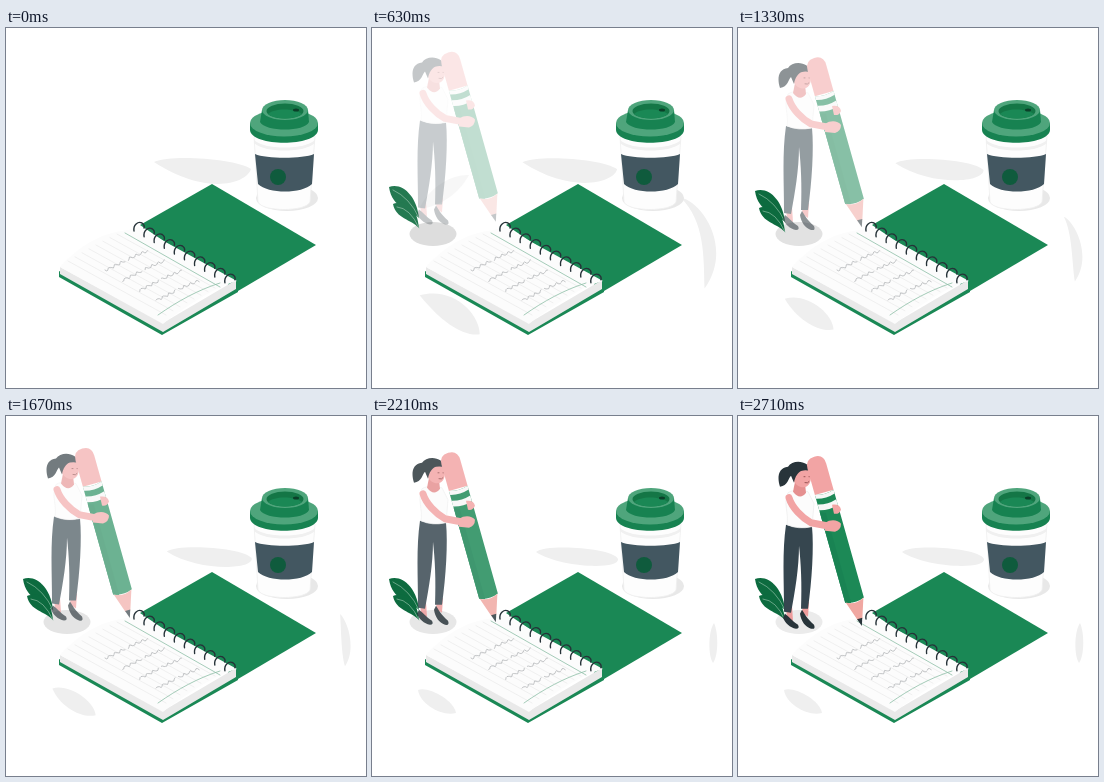
Recreate the animation shown at these times as an HTML page. Size 360 by 360 pixels, loop 2750 ms.

```html
<!DOCTYPE html>
<html>
<head>
<meta charset="utf-8">
<style>
html, body { margin: 0; width: 100%; height: 100%; overflow: hidden; background: #fff; }
svg { display: block; width: 100vw; height: 100vh; }
.line { fill: none; stroke-linecap: round; stroke-linejoin: round; }
</style>
</head>
<body>
<svg viewBox="0 0 360 360">
  <g id="floor" fill="#efefef"></g>
  <path id="sweep" d="M47 181C58 157 82 146 97 147C90 160 74 178 47 181Z" fill="#e6e6e6"/>
  <ellipse id="shade" cx="61" cy="206" rx="23.5" ry="12"/>
  <ellipse cx="281" cy="170" rx="31" ry="13" fill="#e8e8e8"/>

  <g id="cup">
    <path d="M248 108L252 174C256 184 300 184 304 174L309 108Z" fill="#fdfdfd" stroke="#efefef" stroke-width=".8"/>
    <path d="M248 112C258 122 299 122 309 112V115C299 125 258 125 248 115Z" fill="#f0f0f0"/>
    <path d="M249 126C260 131 297 131 308 126L306 156C296 166 262 166 252 156Z" fill="#435761"/>
    <circle cx="272" cy="149" r="8" fill="#0f5b3d"/>
    <path d="M244 95V102C245 119 311 119 312 102V95Z" fill="#178251"/>
    <ellipse cx="278" cy="95" rx="34" ry="13.5" fill="#4fa57c"/>
    <path d="M256 82L254 94C259 104 299 104 303 94L302 82Z" fill="#178251"/>
    <ellipse cx="279" cy="82" rx="23" ry="10" fill="#4fa57c"/>
    <ellipse cx="279" cy="83" rx="18.5" ry="7.5" fill="#147646"/>
    <path d="M262 86C268 80 288 80 296 86C290 92 268 92 262 86Z" fill="#1a8855"/>
    <ellipse cx="290" cy="82" rx="3" ry="1.5" fill="#0b3f29"/>
  </g>

  <g id="leaves"></g>

  <g id="book">
    <path d="M206 156L310 217L232 263L134 197Z" fill="#1a8855"/>
    <path d="M53 243V249L156 307L232 264V259L157 301Z" fill="#1a8855"/>
    <path d="M54 239V246L157 304L230 261V252L157 295Z" fill="#e9e9e9"/>
    <path d="M54 239C72 220 92 205 122 202L132 199L231 253C212 258 184 275 157 296Z" fill="#fcfcfc"/>
    <g id="rules" class="line" stroke="#ededed" stroke-width=".8"></g>
    <path class="line" d="M119 205L214 259M152 287C172 273 192 262 214 255" stroke="#8fbfa7" stroke-width=".8"/>
    <g id="notes" class="line" stroke="#a9adaf" stroke-width=".7"></g>
    <g id="rings" class="line" stroke="#263238" stroke-width="1.4"></g>
  </g>

  <g id="writer">
    <path d="M48 190H54L55 205L49 203ZM65 186H71L70 201L64 197Z" fill="#ee9b9b"/>
    <path d="M47 198C50 200 54 205 60 209Q62 213 58 213C52 212 47 207 45 202ZM64 194C66 197 69 203 76 209Q78 214 73 213C67 211 63 205 62 198Z" fill="#263238"/>
    <path d="M48 109Q60 114 74 111C76 132 74 164 70 193L63 193C64 168 63 148 61 130C61 152 57 176 53 197L46 196C46 164 44 136 48 109Z" fill="#34444d"/>
    <path d="M50 77C56 73 64 75 70 76L76 88L74 111Q60 114 49 109C51 98 45 87 50 77Z" fill="#fcfcfc" stroke="#ededed" stroke-width=".7"/>
    <path d="M57 66L67 68L68 77Q62 85 55 76Z" fill="#e58f8f"/>
    <path d="M53 53C60 47 73 51 73 60C73 69 69 73 62 71C56 69 53 61 53 53Z" fill="#f2a3a3"/>
    <path d="M73 56C72 45 55 43 50 51C40 52 39 62 42 71C50 70 50 63 53 60L56 67C57 61 60 56 64 55Q69 54 73 56Z" fill="#263238"/>
    <path class="line" d="M66 61L67 61M71 61L71.5 61M67 67Q70 68 71 66" stroke="#8e4a4a" stroke-width=".9"/>
    <g transform="translate(123.3 208.5) rotate(-15.7)">
      <path d="M-9.7 -164Q-9.7 -174 0 -174Q9.7 -174 9.7 -164V-137H-9.7Z" fill="#f2a3a3"/>
      <path d="M-9.7 -137Q0 -134 9.7 -137V-25Q0 -21 -9.7 -25Z" fill="#1a8855"/>
      <path d="M-9.7 -137Q0 -134 9.7 -137V-133Q0 -130 -9.7 -133ZM-9.7 -127Q0 -124 9.7 -127V-121Q0 -118 -9.7 -121Z" fill="#f7f7f7"/>
      <path d="M-9.7 -119L-4 -117V-23L-9.7 -25Z" fill="#178251"/>
      <path d="M-9.2 -25Q0 -20 9.2 -25L2.5 -5H-2.5Z" fill="#f0a6a0"/>
      <path d="M-2.7 -6H2.7L0 2Z" fill="#263238"/>
    </g>
    <path class="line" d="M51 82C54 92 64 102 73 107L94 111" stroke="#f2a3a3" stroke-width="7"/>
    <path d="M87 107C93 103 100 104 103 108Q103 114 97 116L87 115Z" fill="#f2a3a3"/>
    <path d="M94 89Q102 88 103 94Q101 99 96 98Z" fill="#f2a3a3"/>
  </g>
</svg>
<script>
const LOOP = 2750;
const $ = id => document.getElementById(id);
const mix = (a, b, k) => a + (b - a) * k;
const clamp = k => Math.max(0, Math.min(1, k));

function addPath(parent, d, attrs = {}) {
  const path = document.createElementNS("http://www.w3.org/2000/svg", "path");
  path.setAttribute("d", d);
  for (const name in attrs) path.setAttribute(name, attrs[name]);
  return parent.appendChild(path);
}

// Closed shape from two cubic curves
const blob = p => `M${p.slice(0, 2)}C${p.slice(2, 8)}C${p.slice(8)} ${p.slice(0, 2)}Z`;

const patches = [
  { from: [148,134, 166,126, 230,131, 245,141, 240,156, 200,168],
    to: [164,136, 172,128, 240,131, 246,143, 248,154, 188,152] },
  { from: [303,163, 325,165, 365,215, 331,263, 331,225, 332,190],
    to: [342,207, 346,215, 347,238, 341,247, 336,240, 336,216], fade: true },
  { from: [48,266, 85,256, 112,285, 112,308, 95,310, 74,296],
    to: [46,274, 56,270, 82,284, 84,297, 70,301, 48,288], fade: true }
];
for (const patch of patches) patch.path = addPath($("floor"), "");

for (const [x, y, bx, by] of [[17, 163, 47, 194], [21, 180, 47, 204]]) {
  addPath($("leaves"), `M${x} ${y}C${x + 13} ${y - 5} ${bx - 2} ${by - 22} ${bx} ${by}C${bx - 8} ${by - 9} ${x + 3} ${by - 9} ${x} ${y}Z`,
    { fill: "#0d6b3f" });
  addPath($("leaves"), `M${x + 4} ${y + 3}Q${bx - 9} ${by - 20} ${bx} ${by}`,
    { class: "line", stroke: "#8dbda4", "stroke-width": .7 });
}

for (let i = 0; i < 8; i++) {
  const x = 62 + i * 7, y = 233 - i * 4.2 + i * i * .05;
  addPath($("rules"), `M${x} ${y}l98 54`);
}

// Four slanted rows of handwriting, two words each
for (let row = 0; row < 4; row++) {
  for (let word = 0; word < 2; word++) {
    const x = 99 + row * 17 + word * 23, y = 242 + row * 10 - word * 10.5;
    let d = "";
    for (let i = 0; i <= 18; i++) {
      const wave = Math.sin(i * 1.15 + row + word * 2) * (1 + Math.sin(i + row) * .7);
      d += `${i ? "L" : "M"}${x + i * 1.1 + wave * .5} ${y - i * .48 + wave}`;
    }
    addPath($("notes"), d);
  }
}

for (let i = 0; i < 10; i++) {
  addPath($("rings"), `M${128 + i * 10.1} ${203 + i * 5.75}c-1 -6 4 -10 8 -8q3 2 2 5`);
}

function draw() {
  const t = performance.now() % LOOP, u = t / LOOP;
  const settle = clamp((t - 380) / 1620), appear = clamp(t / 350);
  for (const { path, from, to, fade } of patches) {
    path.setAttribute("d", blob(from.map((v, i) => mix(v, to[i], settle))));
    path.setAttribute("opacity", fade ? appear : 1);
  }
  $("sweep").setAttribute("opacity", clamp(1 - Math.abs(t - 380) / 380));

  const gray = mix(217, 235, u);
  $("shade").setAttribute("fill", `rgb(${gray},${gray},${gray})`);
  $("shade").setAttribute("opacity", appear);

  $("leaves").setAttribute("opacity", clamp(t / 700));
  $("leaves").setAttribute("transform", `translate(0 ${-24 * clamp(1 - t / 760)})`);

  $("writer").setAttribute("opacity", u ** .9);
  $("writer").setAttribute("transform", `translate(0 ${-21.5 * (1 - u)})`);
  requestAnimationFrame(draw);
}
draw();
</script>
</body>
</html>
```
